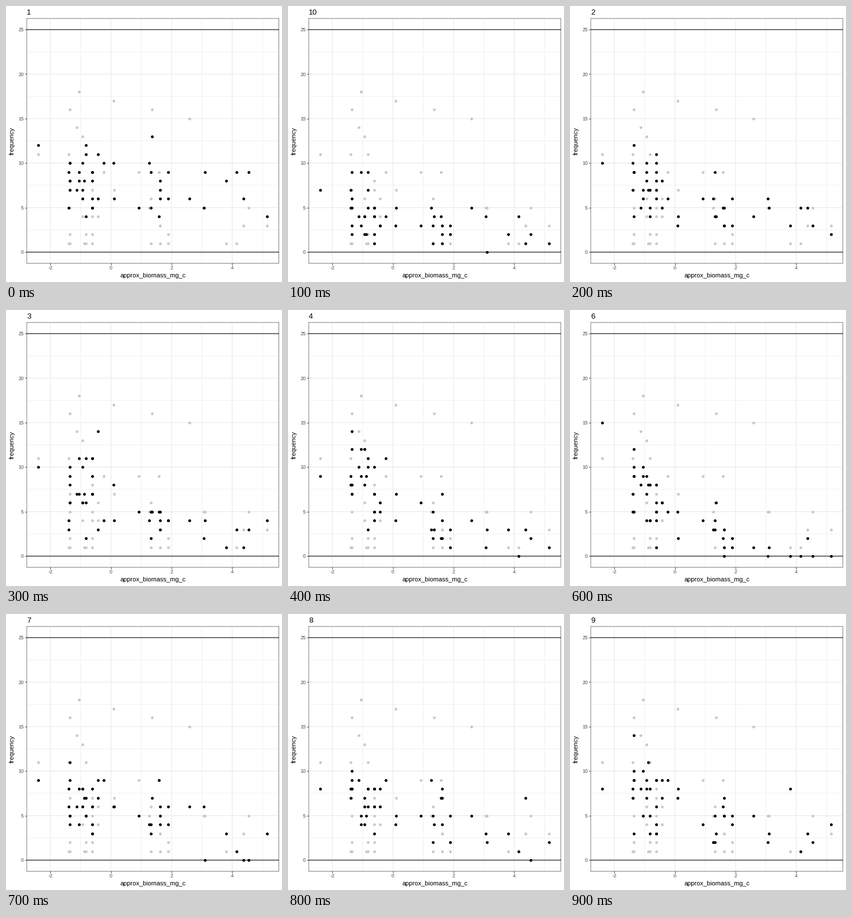
A matplotlib script that plays this animation: 480 px wide and 480 px high, repeating every 1 s.

```python
import matplotlib.pyplot as plt
import numpy as np
from matplotlib.animation import FuncAnimation

SIZE, DPI = 480, 72
LEFT, RIGHT, TOP, BOTTOM = 36.1, 474.5, 21.7, 447.4
X_MIN, X_MAX, Y_MIN, Y_MAX = -2.778, 5.538, -1.25, 26.25
TRIALS = 25
plt.rcParams["font.family"] = "Liberation Sans"
plt.rcParams["path.snap"] = False

# Observed frequency of every species, grouped by biomass
OBSERVED = {
    -2.4: [11], -1.4: [1, 11], -1.35: [1, 2, 5, 7, 16], -1.13: [14],
    -1.05: [18, 18], -0.94: [4, 6, 13], -0.89: [1], -0.82: [1, 2, 11],
    -0.61: [1, 2, 4, 5, 7, 8], -0.43: [4, 6], -0.24: [9], 0.08: [17],
    0.11: [7], 0.91: [9], 1.26: [5], 1.31: [1, 6], 1.355: [16],
    1.58: [9], 1.63: [1, 3, 3], 1.88: [1, 2], 2.59: [15], 3.06: [5],
    3.1: [5], 3.81: [1], 4.14: [1], 4.37: [3], 4.55: [5], 5.15: [3],
}
species = np.array([(x, y) for x, ys in OBSERVED.items() for y in ys])
biomass = species[:, 0]

RUNS = [1, 10, *range(2, 10)]

# Expected frequency of runs 1 to 10 at a low and a high biomass
LOW_X, HIGH_X = -0.9, 3.0
LOW_MEAN = [7.5, 7, 7.3, 8, 7, 7, 6, 7, 7.3, 4.6]
HIGH_MEAN = [6.5, 4, 3.8, 1.8, 4, 1, 3, 4, 3.5, 2.5]


def log_odds(mean):
    return np.log(mean / (TRIALS - mean))


def simulate(run):
    """Binomial frequencies whose log-odds are linear in biomass."""
    low, high = log_odds(LOW_MEAN[run - 1]), log_odds(HIGH_MEAN[run - 1])
    odds = low + (high - low) * (biomass - LOW_X) / (HIGH_X - LOW_X)
    rng = np.random.default_rng(40 + run)
    counts = rng.binomial(TRIALS, 1 / (1 + np.exp(-odds)))
    return np.column_stack([biomass, counts])


def px(value):
    return LEFT + (value - X_MIN) / (X_MAX - X_MIN) * (RIGHT - LEFT)


def py(value):
    return BOTTOM - (value - Y_MIN) / (Y_MAX - Y_MIN) * (BOTTOM - TOP)


def label(x, y, text, size, color="black", **kwargs):
    return fig.text(x / SIZE, 1 - y / SIZE, text, size=size, color=color,
                    **kwargs)


fig = plt.figure(figsize=(SIZE / DPI, SIZE / DPI), dpi=DPI, facecolor="white")
ax = fig.add_axes([LEFT / SIZE, 1 - BOTTOM / SIZE,
                   (RIGHT - LEFT) / SIZE, (BOTTOM - TOP) / SIZE])
ax.set(xlim=(X_MIN, X_MAX), ylim=(Y_MIN, Y_MAX))
x_ticks, y_ticks = range(-2, 5, 2), range(0, 26, 5)
ax.set_xticks(x_ticks, labels=[])
ax.set_yticks(y_ticks, labels=[])
ax.set_xticks(range(-1, 6, 2), minor=True)
ax.set_yticks(np.arange(2.5, 25, 5), minor=True)
ax.set_axisbelow(True)
ax.grid(which="major", color="#e8e8e8", lw=1.07)
ax.grid(which="minor", color="#e8e8e8", lw=0.6)
ax.tick_params(which="major", length=2.75, width=1.07, color="#333333")
ax.tick_params(which="minor", length=0)
for spine in ax.spines.values():
    spine.set(color="#7f7f7f", linewidth=1)

for tick in x_ticks:
    label(px(tick), 458.4, str(tick), 8.8, "#4d4d4d", ha="center")
for tick in y_ticks:
    label(30.9, py(tick) + 3.2, str(tick), 8.8, "#4d4d4d", ha="right")
label(255.3, 472, "approx_biomass_mg_c", 11, ha="center")
label(16, 234.5, "frequency", 11, rotation=90, ha="right", va="center")
title = label(36, 15.2, "", 13.2)

dots = dict(s=24, linewidths=0)
ax.scatter(*species.T, color="#cacaca", zorder=3, **dots)
simulated = ax.scatter([], [], color="black", zorder=4, **dots)
for level in (0, TRIALS):
    ax.axhline(level, color="black", lw=1.07, zorder=5)


def update(frame):
    run = RUNS[frame]
    title.set_text(str(run))
    simulated.set_offsets(simulate(run))
    return title, simulated


anim = FuncAnimation(fig, update, frames=len(RUNS), interval=100, repeat=True)
plt.show()
```
